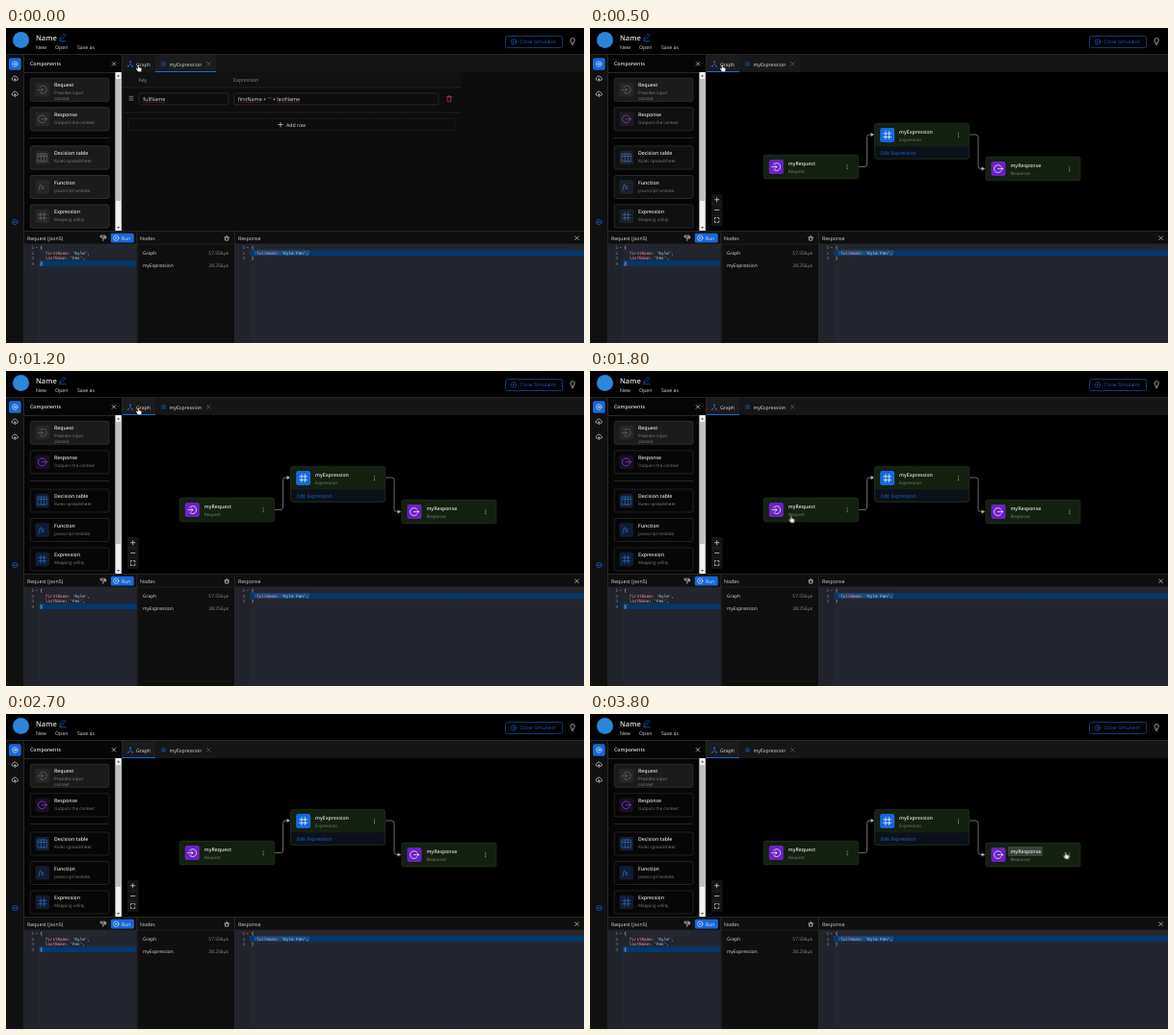
An HTML page that plays this animation: 600 by 328 pixels, repeating every 3900 ms.

```html
<!DOCTYPE html>
<html lang="en">
<head>
<meta charset="utf-8">
<title>Expression editor</title>
<style>
html, body { margin: 0; width: 100%; height: 100%; overflow: hidden; background: #000; }
svg { display: block; }
text { font: 5.2px "Open Sans", "Noto Sans", sans-serif; fill: #dcdcdc; text-rendering: geometricPrecision; white-space: pre; }
.b { font-weight: 600; }
.sub { font-size: 4.5px; fill: #7c7c7c; }
.dim { fill: #8a8a8a; }
.link { fill: #1a66d0; }
.field text { font-size: 5.4px; }
.nodes text { font-size: 4.9px; }
.code text { font: 4.28px "DejaVu Sans Mono", monospace; fill: #d5dae2; }
.code .key { fill: #ee8d98; }
.code .str { fill: #b4d2f2; }
.code .num { fill: #7d8490; }
.line { fill: none; stroke: #262626; }
.ico { fill: none; stroke: currentColor; stroke-width: .7; stroke-linecap: round; stroke-linejoin: round; }
.white { color: #dcdcdc; }
.blue { color: #1a66d0; }
.grey { color: #666; }
.red { color: #c03a3e; }

.table, .graph, .off, .mark, .hand, .hot { animation: 3.9s infinite step-end; }
.table { animation-name: table; }
.graph { animation-name: graph; }
.off { animation-name: off; }
.mark { animation-name: mark; }
.hot { animation-name: hot; }
.hand { animation-name: move; }
@keyframes table { 0% { visibility: visible; } 12.81%, 100% { visibility: hidden; } }
@keyframes graph { 0% { visibility: hidden; } 12.81%, 100% { visibility: visible; } }
@keyframes off {
  0% { opacity: 1; }
  12.81% { opacity: .5; }
  15.37% { opacity: .15; }
  17.94%, 100% { opacity: 0; }
}
@keyframes mark { 0% { opacity: 0; } 92.29%, 100% { opacity: 1; } }
@keyframes hot { 0% { fill: #b9c9de; } 12.81%, 100% { fill: #dcdcdc; } }
@keyframes move {
  0% { transform: translate(138px, 42px); }
  30.75% { transform: translate(138px, 42px); animation-timing-function: steps(6, end); }
  46.13% { transform: translate(209.5px, 154.5px); opacity: 1; animation-timing-function: steps(6, end); }
  61.52% { transform: translate(330px, 112px); opacity: 0; }
  79.46% { transform: translate(384px, 118px); opacity: 1; animation-timing-function: steps(5, end); }
  92.29% { transform: translate(462px, 145px); animation-timing-function: steps(2, end); }
  97.41%, 100% { transform: translate(494.5px, 147.5px); }
}
</style>
</head>
<body>
<svg width="600" height="328" viewBox="0 0 600 328">
  <defs>
    <g id="in" class="ico"><path d="M4.3 4.4a4 4 0 1 1 0 5.2M2.4 7h5.2M6 5.3 7.7 7 6 8.7"/></g>
    <g id="out" class="ico"><path d="M9.7 4.4a4 4 0 1 0 0 5.2M6.4 7h5.2M10 5.3 11.7 7 10 8.7"/></g>
    <g id="hash" class="ico"><path d="M5.3 3v8M8.8 3v8M3 5.3h8M3 8.8h8"/></g>
    <g id="grid" class="ico"><path d="M2.5 3h9v8h-9zM2.5 5.5h9M5.5 3v8M8.5 3v8"/></g>
    <g id="fx"><text x="3" y="9.4" style="font: italic 7px 'Noto Serif', serif; fill: currentColor">fx</text></g>
    <g id="x" class="ico"><path d="M-1.8-1.8 1.8 1.8M1.8-1.8-1.8 1.8"/></g>
    <g id="plus" class="ico"><path d="M-2.2 0h4.4M0-2.2v4.4"/></g>
    <g id="play" class="ico"><circle r="2.7"/><path d="M-.8-1.2 1.2 0-.8 1.2z" fill="currentColor" stroke="none"/></g>
    <g id="cloud" class="ico"><path d="M-1.5 1.5h-.4a1.5 1.5 0 0 1-.2-2.9 2.2 2.2 0 0 1 4.2 0 1.5 1.5 0 0 1-.2 2.9h-.4M0 2.6V-.2M-1 .8 0-.2 1 .8"/></g>
    <g id="dots" fill="#aaa"><circle cy="-1.9" r=".55"/><circle r=".55"/><circle cy="1.9" r=".55"/></g>
  </defs>

  <!-- Header -->
  <circle cx="15.5" cy="12.5" r="8.5" fill="#2b86d9"/>
  <text x="31" y="13" class="b" style="font-size: 7.5px">Name</text>
  <path class="ico blue" d="m56 12 .4-1.9 4-4 1.5 1.5-4 4zM55.5 13.6h6.5"/>
  <text x="31" y="22">New</text><text x="51" y="22">Open</text><text x="74" y="22">Save as</text>
  <rect x="518.5" y="8.5" width="59" height="12" rx="2" fill="none" stroke="#174a94" stroke-width=".8"/>
  <use href="#play" x="527" y="14.4" class="blue"/>
  <text x="533.5" y="16.4" class="link">Close Simulator</text>
  <path class="ico white" d="M587.1 15.6c0-1-1.2-1.3-1.2-2.8a2.2 2.2 0 0 1 4.4 0c0 1.5-1.2 1.8-1.2 2.8zM587.2 17.2h1.8"/>
  <path class="line" d="M0 27.5h600"/>

  <!-- Side rail -->
  <rect y="28" width="18" height="300" fill="#101010"/>
  <path class="line" d="M18.5 28v300"/>
  <rect x="3" y="31.2" width="12.6" height="12.6" rx="2" fill="#1668dc"/>
  <g class="white ico" transform="translate(9.3 37.5)"><circle r="2.8"/><path d="M-1.3 0h2.6M0-1.3v2.6"/></g>
  <use href="#cloud" x="9.3" y="53" class="white"/>
  <use href="#cloud" x="9.3" y="69" class="white"/>
  <use href="#play" x="9.3" y="202" class="blue"/>

  <!-- Components -->
  <rect x="19" y="28" width="101" height="183" fill="#060606"/>
  <text x="25" y="39.3" class="b">Components</text>
  <use href="#x" x="112" y="37.3" class="white"/>
  <path class="line" d="M19 46.5h94M25 114.5h82"/>
  <g id="cards"></g>
  <rect x="113.4" y="46" width="6.4" height="165" fill="#f1f1f1"/>
  <rect x="114" y="53" width="5.2" height="127" fill="#c1c1c1"/>
  <path d="m115.1 50.5 1.5-2 1.5 2zM115.1 207l1.5 2 1.5-2z" fill="#555"/>
  <path class="line" d="M120.5 28v183"/>

  <!-- Tabs -->
  <rect x="121" y="28" width="479" height="18" fill="#161616"/>
  <g class="table">
    <rect x="155" y="28" width="63" height="18" fill="#1c1c1c"/>
    <rect x="155" y="45" width="63" height="1" fill="#1668dc"/>
  </g>
  <g class="graph">
    <rect x="121" y="28" width="34" height="18" fill="#1c1c1c"/>
    <rect x="155" y="28" width="63" height="18" fill="#1c1c1c" class="off"/>
    <rect x="121" y="45" width="34" height="1" fill="#1668dc"/>
  </g>
  <g class="blue">
    <path class="ico" d="M129 35.5v2l-2 2.5M129 37.5l2 2.5"/>
    <g fill="currentColor"><circle cx="129" cy="35.2" r=".9"/><circle cx="126.9" cy="39.8" r=".9"/><circle cx="131.1" cy="39.8" r=".9"/></g>
    <use href="#hash" transform="translate(159.3 33.2) scale(.6)"/>
  </g>
  <text x="135" y="39.5" class="hot">Graph</text>
  <text x="169.5" y="39.5">myExpression</text>
  <use href="#x" x="210.3" y="37.3" class="grey"/>

  <!-- Expression table -->
  <g class="table">
    <rect x="121" y="46" width="479" height="165" fill="#0d0d0d"/>
    <rect x="121" y="46" width="351" height="16" fill="#111"/>
    <path class="line" d="M121 62h351M121 88h351" stroke-width=".8"/>
    <text x="137.5" y="56" class="dim">Key</text>
    <text x="236" y="56" class="dim">Expression</text>
    <path class="ico" style="color: #999" d="M128 71.3h4M128 73.2h4M128 75.1h4"/>
    <g fill="#0d0d0d" stroke="#2c2c2c" stroke-width=".8">
      <rect x="138" y="67.8" width="93" height="12.2" rx="1.5"/>
      <rect x="236.5" y="67.8" width="212.5" height="12.2" rx="1.5"/>
      <rect x="127" y="94.5" width="339" height="12.2" rx="1.5" stroke-dasharray="1.2 1"/>
    </g>
    <g class="field">
      <text x="142.3" y="75.8">fullName</text>
      <text x="240.7" y="75.8">firstName + ' ' + lastName</text>
    </g>
    <path stroke="#b53438" stroke-width=".6" stroke-dasharray="1 .4" d="M142 77.3h23M240.5 77.3h25M281.5 77.3h24"/>
    <path class="ico red" d="M457.5 71.8h5M459 71.8v-1h2v1M458 71.8l.4 4.8h3.2l.4-4.8"/>
    <use href="#plus" x="285" y="100.6" class="white"/>
    <text x="291" y="102.7">Add row</text>
  </g>

  <!-- Graph -->
  <g class="graph">
    <rect x="121" y="46" width="479" height="165" fill="#000"/>
    <g fill="none" stroke="#858585" stroke-width=".8">
      <path d="M279 144.5h6a2.5 2.5 0 0 0 2.5-2.5v-28.5a2.5 2.5 0 0 1 2.5-2.5h3.5"/>
      <path d="M394 111h6.5a2.5 2.5 0 0 1 2.5 2.5v30.5a2.5 2.5 0 0 0 2.5 2.5h3.5"/>
    </g>
    <path fill="#b5b5b5" d="m291.5 109 3.5 2-3.5 2zM406.5 144.5l3.5 2-3.5 2z"/>
    <g id="nodes"></g>
    <rect x="126" y="173" width="11.5" height="33" fill="#141414"/>
    <path class="line" d="M126 184h11.5M126 195h11.5" stroke-width=".7"/>
    <use href="#plus" x="131.7" y="178.7" class="white"/>
    <path class="ico white" d="M129.5 189.5h4.4M129.5 199v-1.4h1.4M132.5 197.6h1.4v1.4M133.9 201v1.4h-1.4M130.9 202.4h-1.4V201"/>
  </g>

  <!-- Simulator -->
  <rect x="19" y="212" width="581" height="116" fill="#0f0f0f"/>
  <path class="line" d="M19 211.5h581"/>
  <text x="22" y="220.6">Request (json5)</text>
  <path class="ico white" d="M98.5 216.2h4.2v1.8h-4.2zM102.7 217h1v2h-2.9v2.4"/>
  <rect x="108.8" y="213.8" width="24" height="9.6" rx="1.5" fill="#1668dc"/>
  <use href="#play" x="114.3" y="218.6" class="white"/>
  <text x="119.8" y="220.6">Run</text>
  <text x="139" y="220.6">Nodes</text>
  <path class="ico white" d="M227 218h4.4M227.5 218v3h3.4v-3M229.2 218v-1.8"/>
  <text x="241" y="220.6">Response</text>
  <use href="#x" x="592.6" y="218.7" class="white"/>
  <path class="line" d="M19 225h581" stroke-width=".7"/>
  <g class="nodes">
    <text x="142" y="236.4">Graph</text>
    <text x="142" y="249">myExpression</text>
    <g text-anchor="end">
      <text x="231" y="236.4" class="dim">57.556µs</text>
      <text x="231" y="249" class="dim">38.256µs</text>
    </g>
  </g>
  <g class="code">
    <path fill="#23262e" d="M19 225h116.5v103H19zM237.500 225h362.500v103H237.500z"/>
    <path fill="#20232a" d="M19 225h14.500v103H19zM237.500 225h15.500v103h-15.500z"/>
    <path fill="#03386c" d="M33.500 242.200h102v5.800h-102zM253 231.200h347v5.700H253z"/>
    <path fill="#1b4c80" d="M35 242.600h3.600v5H35zM257.500 231.600h57.500v4.900h-57.500z"/>
    <path d="M461.500 237v91" stroke="#17294b" stroke-width=".8"/>
    <g id="lines"></g>
    <path class="ico grey" d="M31 228.500h1.500M250 228.500h1.500"/>
    <text x="35.500" y="230">{</text>
    <text x="40.700" y="235.500"><tspan class="key">firstName</tspan>: <tspan class="str">'Kyle'</tspan>,</text>
    <text x="40.700" y="241"><tspan class="key">lastName</tspan>: <tspan class="str">'Fen'</tspan>,</text>
    <text x="35.500" y="246.500">}</text>
    <text x="254.800" y="230">{</text>
    <text x="260" y="235.500"><tspan class="key">fullName</tspan>: <tspan class="str">'Kyle Fen'</tspan>,</text>
    <text x="254.800" y="241">}</text>
  </g>
  <path class="line" d="M136 212v116M237.500 212v116"/>

  <path class="hand" d="M-1.3-3.2c0-.9 1.2-.9 1.2 0v2.3l2.1.5c.7.2.9.6.8 1.2L2.4 3.5h-3.4L-2.8.7c-.4-.7.4-1.2.9-.7l.6.6z" fill="#fff" stroke="#222" stroke-width=".35"/>
</svg>
<script>
const put = (id, html) => document.getElementById(id).innerHTML = html;
const icon = (name, x, y, color) => `<g style="color:${color}"><use href="#${name}" x="${x}" y="${y}"/></g>`;
const box = (x, y, w, h, fill, stroke = 'none', r = 2) =>
  `<rect x="${x}" y="${y}" width="${w}" height="${h}" rx="${r}" fill="${fill}" stroke="${stroke}" stroke-width=".8"/>`;

const violet = ['#1a1025', '#8a3fd6'], navy = ['#111d33', '#2f6fc0'];

function card([y, name, title, subs, tint]) {
  const face = (bg, edge, tile, ink) =>
    box(25.3, y, 81.7, 24, bg, edge) + box(30.5, y + 4.8, 14.5, 14.5, tile) + icon(name, 30.8, y + 5, ink);
  const on = tint ? face('#070707', '#272727', ...tint) : '';
  return `${on}<g class="${tint ? 'off' : ''}">${face('#1b1b1b', '#303030', '#272727', '#6a6a6a')}</g>
    <text x="50" y="${y + 9.1}" class="b">${title}</text>` +
    subs.map((s, i) => `<text x="50" y="${y + 17.1 + i * 6}" class="sub">${s}</text>`).join('');
}

function node([x, y, name, title, sub, fill, action, mark]) {
  return box(x, y, 98, action ? 37 : 24.5, action ? '#0c1119' : '#142010', '#27331f') +
    (action ? box(x + .4, y + .4, 97.2, 23.6, '#142010') +
      `<text x="${x + 6.3}" y="${y + 32.8}" class="link">${action}</text>` : '') +
    box(x + 5.5, y + 4.8, 15, 15, fill) + icon(name, x + 6, y + 5.3, '#fff') +
    (mark ? `<g class="mark">${box(x + 23, y + 3.8, 36, 10, '#3a4338', 'none', 1.5)}</g>` : '') +
    `<text x="${x + 25.5}" y="${y + 10.9}" class="b">${title}</text>
     <text x="${x + 25.5}" y="${y + 18.8}" class="sub">${sub}</text>
     <use href="#dots" x="${x + 86.8}" y="${y + 12.4}"/>`;
}

put('cards', [
  [52.3, 'in', 'Request', ['Provides input', 'context']],
  [82.8, 'out', 'Response', ['Outputs the context'], violet],
  [123, 'grid', 'Decision table', ['Rules spreadsheet'], navy],
  [153.5, 'fx', 'Function', ['Javascript lambda'], navy],
  [184, 'hash', 'Expression', ['Mapping utility'], navy],
].map(card).join(''));

put('nodes', [
  [180.3, 132.3, 'in', 'myRequest', 'Request', '#6a22c4'],
  [295.6, 99.3, 'hash', 'myExpression', 'Expression', '#1668dc', 'Edit Expression'],
  [410.9, 134.3, 'out', 'myResponse', 'Response', '#6a22c4', '', true],
].map(node).join(''));

const numbers = (x, count) => Array.from({ length: count }, (_, i) =>
  `<text x="${x}" y="${230 + i * 5.5}" class="num">${i + 1}</text>`).join('');
put('lines', numbers(26.5, 4) + numbers(245.5, 3));
</script>
</body>
</html>
```
